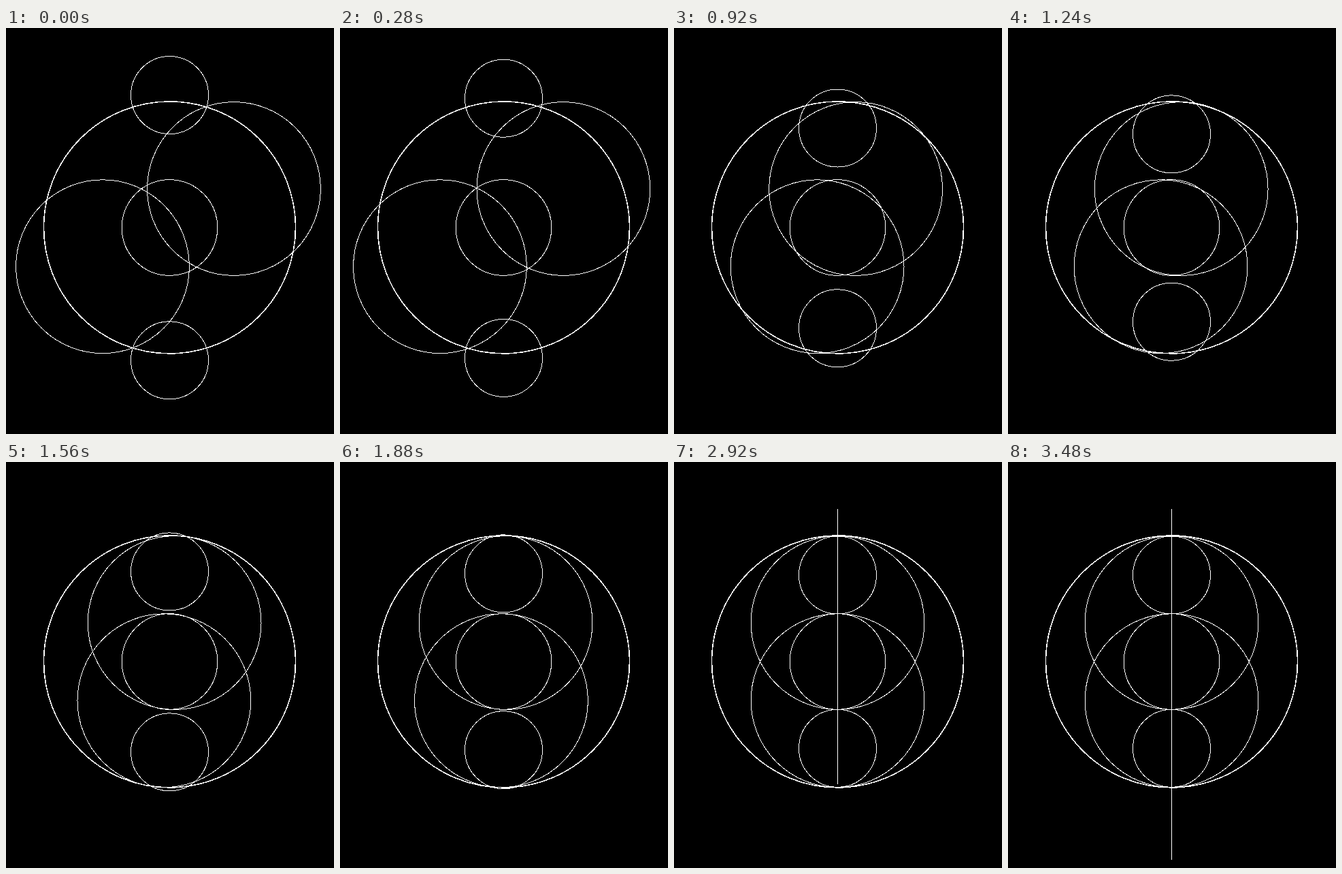
Recreate the animation shown at these times as an HTML page. Size 482 by 596 pixels, loop 8 s.

```html
<!DOCTYPE html>
<html lang="en">
<head>
<meta charset="utf-8">
<title>Circles</title>
<style>
  html, body { margin: 0; width: 100%; height: 100%; overflow: hidden; background: #000; }
  svg { display: block; }
  circle { fill: none; stroke: #fff; stroke-width: 1; shape-rendering: crispEdges; }
  rect { fill: #fff; shape-rendering: crispEdges; }
</style>
</head>
<body>
<svg width="482" height="596" viewBox="0 0 482 596">
  <circle cx="240.5" cy="292.9" r="185" style="stroke-width:1.6"/>
  <circle cx="240.5" cy="293" r="70.3"/>
  <circle id="top" cx="240.5" r="57"/>
  <circle id="bottom" cx="240.5" r="57"/>
  <circle id="right" cy="236" r="127.4"/>
  <circle id="left" cy="350.2" r="127.4"/>
  <rect id="axis" x="240" y="69" width="1"/>
</svg>
<script>
const LOOP = 8000, STEP = 40;
const byId = id => document.getElementById(id);

// Cubic bezier (0.337, 0, 0.016, 1), solved for its parameter by bisection.
function ease(x) {
  if (x <= 0) return 0;
  if (x >= 1) return 1;
  let lo = 0, hi = 1;
  for (let i = 0; i < 30; i++) {
    const s = (lo + hi) / 2, r = 1 - s;
    const bx = 3 * s * r * r * 0.337 + 3 * s * s * r * 0.016 + s * s * s;
    if (bx < x) lo = s; else hi = s;
  }
  return lo * lo * (3 - 2 * lo);
}

const movers = [
  { id: "top", attr: "cy", rest: 166, offset: -67.5, start: -38 },
  { id: "right", attr: "cx", rest: 240.5, offset: 94.5, start: -38 },
  { id: "bottom", attr: "cy", rest: 420.3, offset: 67.5, start: 0 },
  { id: "left", attr: "cx", rest: 240.5, offset: -98.5, start: 0 }
].map(m => ({ ...m, el: byId(m.id) }));
const axis = byId("axis");

function draw(t) {
  for (const m of movers) {
    const left = 1 - ease((t - m.start) / 2643);
    m.el.setAttribute(m.attr, m.rest + m.offset * left);
  }
  axis.setAttribute("height", Math.round(515 * ease((t - 2510) / 990)));
}

const origin = performance.now();
function tick() {
  const t = (performance.now() - origin) % LOOP;
  draw(Math.floor(t / STEP) * STEP);
  requestAnimationFrame(tick);
}
draw(0);
requestAnimationFrame(tick);
</script>
</body>
</html>
```
